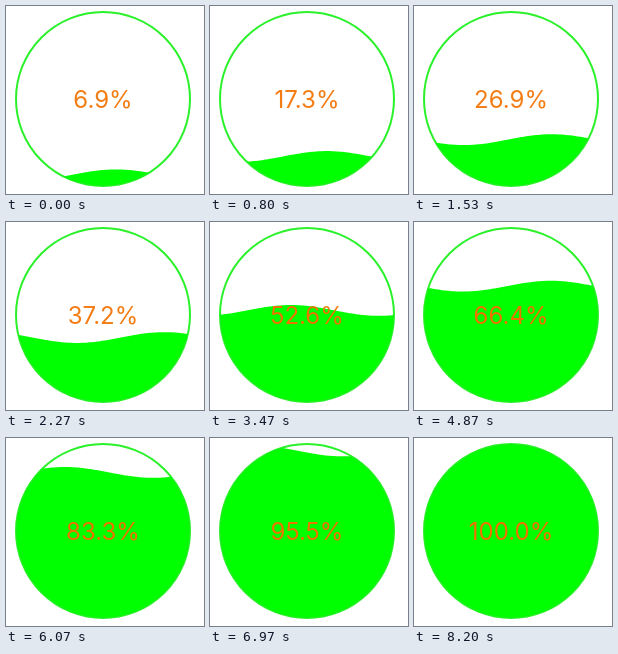
An HTML page with a canvas that plays this animation: 198 by 188 pixels, repeating every 8230 ms.

```html
<!DOCTYPE html>
<html lang="en">
<head>
<meta charset="utf-8">
<title>Wave progress</title>
<style>
  html, body { margin: 0; width: 198px; height: 188px; overflow: hidden; background: #fff; }
  canvas { display: block; }
</style>
</head>
<body>
<canvas id="stage" width="198" height="188"></canvas>
<script>
const ctx = document.getElementById('stage').getContext('2d');
const LOOP = 8230, STEP = 100 / 3;
const CX = 97, CY = 93, R = 87, TANK = 88;
const GREEN = '#00ff00', RING = 'rgba(20, 240, 20, 0.9)';
const ORANGE = '#f37d14', ORANGE_WET = '#f07000';
const WAVE = { length: 176, height: 5.4, crest: 110, shift: 7.05 };

// [time in ms, percent]
const PROGRESS = [
  [0, 6.9], [1533, 26.9], [2267, 37.2], [3467, 52.6],
  [4867, 66.4], [5833, 80.5], [6067, 83.3], [7300, 100], [LOOP, 100]
];

function percentAt(t) {
  const i = Math.max(1, PROGRESS.findIndex(([time]) => time >= t));
  const [t0, p0] = PROGRESS[i - 1], [t1, p1] = PROGRESS[i];
  return p0 + (p1 - p0) * (t - t0) / (t1 - t0);
}

function circle(radius) {
  ctx.beginPath();
  ctx.arc(CX, CY, radius, 0, Math.PI * 2);
}

function wavePath(level, crest) {
  ctx.beginPath();
  ctx.moveTo(0, 188);
  for (let x = 0; x <= 198; x += 2) {
    ctx.lineTo(x, level - WAVE.height * Math.cos((x - crest) / WAVE.length * Math.PI * 2));
  }
  ctx.lineTo(198, 188);
  ctx.closePath();
}

function label(text, color) {
  ctx.font = '24px Inter, sans-serif';
  ctx.textAlign = 'center';
  ctx.fillStyle = color;
  ctx.fillText(text, CX, 102);
}

function draw(ms) {
  const step = Math.floor((ms % LOOP + 5) / STEP);
  const percent = percentAt(Math.min(step * STEP, LOOP));
  const text = percent.toFixed(1) + '%';

  ctx.fillStyle = '#fff';
  ctx.fillRect(0, 0, 198, 188);
  label(text, ORANGE);

  ctx.save();
  circle(R);
  ctx.clip();
  wavePath(CY + TANK - percent / 100 * TANK * 2, WAVE.crest - WAVE.shift * step);
  ctx.fillStyle = GREEN;
  ctx.fill();
  ctx.clip();
  label(text, ORANGE_WET);
  ctx.restore();

  circle(R);
  ctx.lineWidth = 2;
  ctx.strokeStyle = RING;
  ctx.stroke();
}

const start = performance.now();
function tick() {
  draw(performance.now() - start);
  requestAnimationFrame(tick);
}
tick();
</script>
</body>
</html>
```
